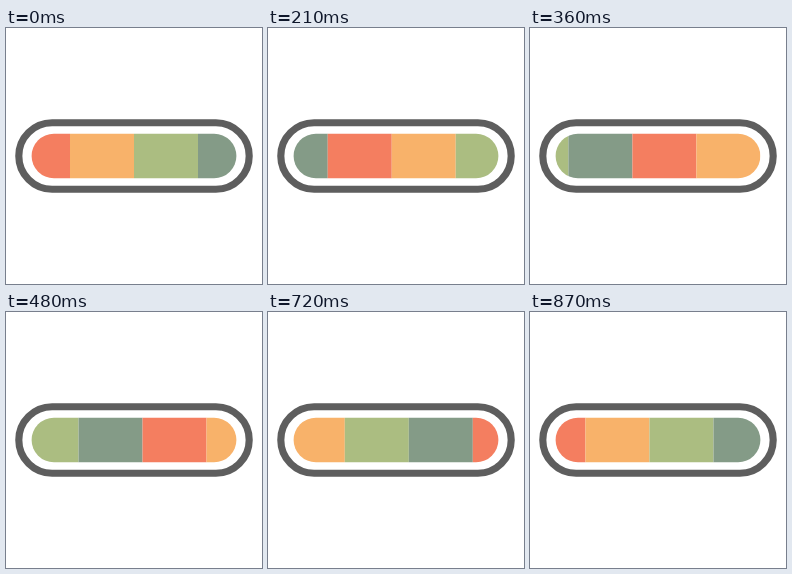
Animation of 256 by 256 pixels, one loop 0.9 s. Source, as an HTML page:

```html
<!DOCTYPE html>
<html lang="en">
<head>
<meta charset="utf-8">
<title>Striped loader</title>
<style>
  html, body { margin: 0; width: 100%; height: 100%; overflow: hidden; background: #fff; }
  svg { display: block; width: 100%; height: 100%; }
</style>
</head>
<body>
<svg viewBox="0 0 100 100">
  <defs>
    <clipPath id="pill"><rect x="10" y="41.3" width="80" height="17.4" rx="8.7"/></clipPath>
  </defs>
  <rect x="5" y="37" width="90" height="26" rx="13" fill="none" stroke="#5e5e5e" stroke-width="2.7928"/>
  <g clip-path="url(#pill)"><g id="bands"></g></g>
</svg>
<script>
  const LOOP = 900, STEP = 30, WIDTH = 25;
  const COLORS = ['#f47e60', '#f8b26a', '#abbd81', '#849b87'];
  const bands = document.getElementById('bands');

  // Two runs of the palette: one on the stage, one waiting to its left.
  for (let i = -COLORS.length; i < COLORS.length; i++) {
    const rect = document.createElementNS('http://www.w3.org/2000/svg', 'rect');
    const attrs = { x: i * WIDTH, y: 0, width: WIDTH, height: 100, fill: COLORS[(i + COLORS.length) % COLORS.length] };
    for (const name in attrs) rect.setAttribute(name, attrs[name]);
    bands.append(rect);
  }

  function draw(time) {
    const step = Math.floor((time % LOOP) / STEP);
    bands.setAttribute('transform', `translate(${step * STEP / LOOP * 100} 0)`);
  }

  function tick() {
    draw(performance.now());
    requestAnimationFrame(tick);
  }

  draw(0);
  requestAnimationFrame(tick);
</script>
</body>
</html>
```
